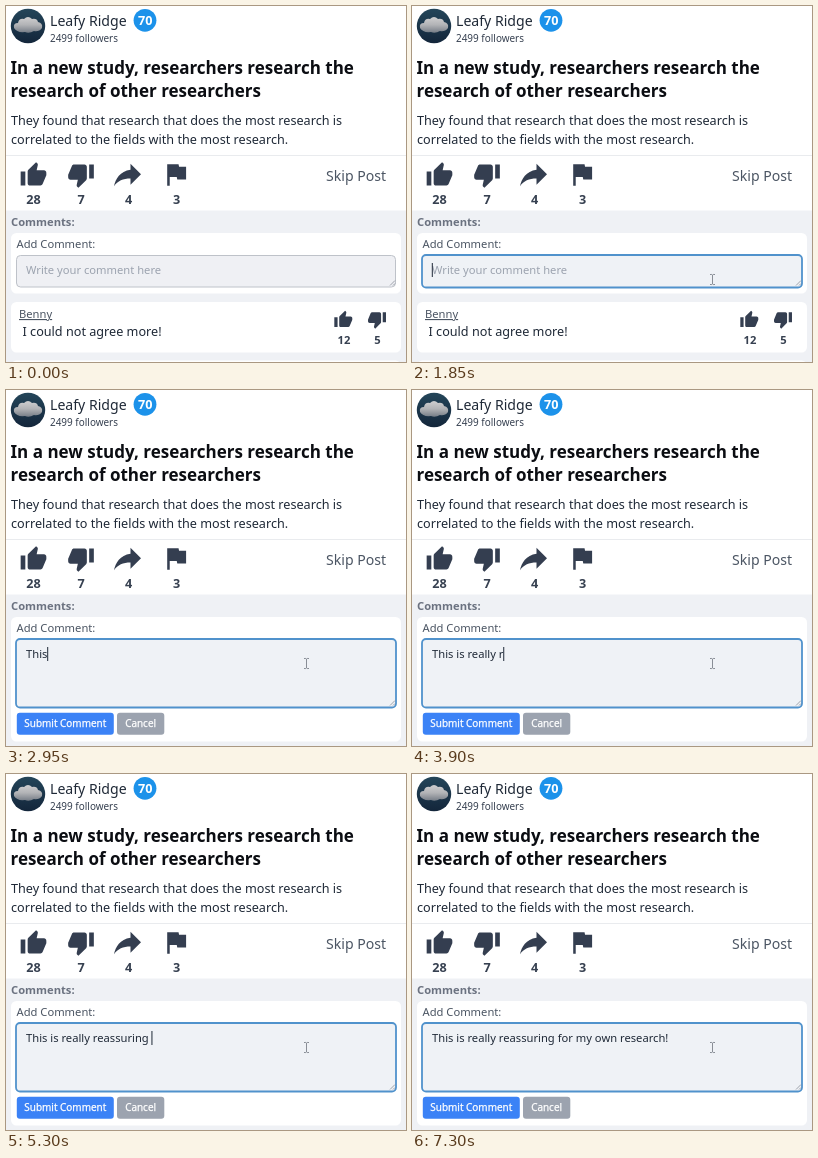
Animation, 400 px wide and 356 px high, one loop 8 s. Source, as an HTML page:

```html
<!DOCTYPE html>
<html lang="en">
<head>
<meta charset="utf-8">
<title>Comment box</title>
<style>
  html, body { margin: 0; width: 100%; height: 100%; overflow: hidden; background: #fff; }
  svg { display: block; width: 400px; height: 356px; font: 11.2px "Noto Sans", "Open Sans", sans-serif; }
  text { fill: #1f2937; white-space: pre; }
  .xl { font-size: 17px; font-weight: 700; fill: #0b0d12; }
  .lg { font-size: 14.1px; }
  .md { font-size: 12.65px; }
  .sm { font-size: 9.95px; }
  .bold { font-weight: 700; }
  .mid { text-anchor: middle; }
  .white { fill: #fff; }
  .slate { fill: #374151; }
  .gray { fill: #4b5563; }
  .button { font-weight: 500; stroke: #fff; stroke-width: .25; }
</style>
</head>
<body>
<svg viewBox="0 0 400 356">
  <defs>
    <clipPath id="round"><circle cx="22" cy="20" r="17.2"/></clipPath>
    <linearGradient id="sky" x2="0" y2="1">
      <stop stop-color="#24465a"/><stop offset="1" stop-color="#13253a"/>
    </linearGradient>
    <linearGradient id="cloud" x2="0" y2="1">
      <stop stop-color="#cfcfd0"/><stop offset=".5" stop-color="#b2b3b6"/><stop offset="1" stop-color="#757c86"/>
    </linearGradient>
    <path id="thumb" transform="translate(-12 -12)" d="M1 21h4V9H1zM23 10c0-1.1-.9-2-2-2h-6.3l1-4.6v-.3c0-.4-.2-.8-.5-1.1L14.2 1 7.6 7.6C7.2 8 7 8.5 7 9v10c0 1.1.9 2 2 2h9c.8 0 1.5-.5 1.8-1.2l3-7.1c.1-.2.2-.4.2-.7z"/>
  </defs>

  <!-- Post -->
  <g clip-path="url(#round)">
    <rect x="4" y="2" width="36" height="36" fill="url(#sky)"/>
    <path fill="url(#cloud)" d="M8 22q-1-5 4-5 1-5 6-4 4-4 8 0 5-1 6 3 5 1 4 6-3 4-8 3-5 3-9 1-8 1-11-4z"/>
  </g>
  <text class="lg" x="44" y="19.5">Leafy Ridge</text>
  <text class="sm slate" x="44" y="36.2">2499 followers</text>
  <circle cx="139" cy="14.3" r="11.4" fill="#1c92ea"/>
  <text class="md bold white mid" x="139.2" y="18.8">70</text>
  <text class="xl" x="4.5" y="68">In a new study, researchers research the</text>
  <text class="xl" x="4.5" y="90.5">research of other researchers</text>
  <text class="md" x="5" y="118.5">They found that research that does the most research is</text>
  <text class="md" x="5" y="138.2">correlated to the fields with the most research.</text>
  <path d="M0 149.5H400" stroke="#e9ebee"/>
  <g fill="#343e50">
    <use href="#thumb" transform="translate(27.5 169) scale(1.167)"/>
    <use href="#thumb" transform="translate(75 169) scale(-1.167)"/>
    <path transform="translate(103.5 150.2) scale(1.5)" d="M14 9V5l7 7-7 7v-4.1c-5 0-8.5 1.6-11 5.1 1-5 4-10 11-11z"/>
    <path transform="translate(154.9 153.3) scale(1.26)" d="M14.4 6L14 4H5v17h2v-7h5.6l.4 2h7V6z"/>
  </g>
  <g class="md bold mid">
    <text class="slate" x="27.5" y="197.5">28</text>
    <text class="slate" x="75" y="197.5">7</text>
    <text class="slate" x="122.5" y="197.5">4</text>
    <text class="slate" x="170.5" y="197.5">3</text>
  </g>
  <text class="lg gray" x="320" y="175">Skip Post</text>

  <!-- Comments -->
  <rect y="204.5" width="400" height="152" fill="#eff1f5"/>
  <text class="bold" x="5" y="219.5" style="fill:#6b7280">Comments:</text>
  <rect id="card" x="5" y="227" width="390" rx="5.5" fill="#fff"/>
  <text class="gray" x="10.5" y="242">Add Comment:</text>
  <rect id="box" rx="4"/>
  <path id="grip" d="M384 279.5l5-5M387 279.5l2-2" stroke="#8a8f98" stroke-width=".8"/>
  <text id="hint" x="20" y="268" style="fill:#9ca3af">Write your comment here</text>
  <text id="typed" x="20" y="268" xml:space="preserve"></text>
  <rect id="caret" y="257" width="1" height="14" fill="#1f2937"/>

  <g id="reply">
    <rect x="5" y="296" width="390" height="50.5" rx="5.5" fill="#fff"/>
    <rect x="5" y="354.5" width="390" height="50" rx="5.5" fill="#fff"/>
    <text class="gray" x="13" y="312" text-decoration="underline">Benny</text>
    <text class="md" x="16.5" y="330">I could not agree more!</text>
    <g fill="#343e50">
      <use href="#thumb" transform="translate(337.3 313.7) scale(.817)"/>
      <use href="#thumb" transform="translate(371 313.7) scale(-.817)"/>
    </g>
    <text class="bold mid slate" x="338" y="338">12</text>
    <text class="bold mid slate" x="371.5" y="338">5</text>
  </g>

  <g id="buttons">
    <rect x="10.8" y="322.8" width="97" height="22" rx="3" fill="#3b82f6"/>
    <text class="sm button white mid" x="59.3" y="337.3">Submit Comment</text>
    <rect x="111" y="322.8" width="47.3" height="22" rx="3" fill="#9ca3af"/>
    <text class="sm button white mid" x="134.6" y="337.3">Cancel</text>
  </g>

  <g id="mouse">
    <path id="beam" d="M-2.5-5H-.7L0-4.4.7-5H2.5M0-4.4V4.4M-2.5 5H-.7L0 4.4.7 5H2.5" fill="none" stroke="#7d838c" stroke-width=".9"/>
    <path id="arrow" d="M0 0V11l2.6-2.4L4.3 12.5l1.6-.7L4.2 8H7.7z" fill="#111" stroke="#fff" stroke-width=".7"/>
  </g>
</svg>
<script>
const LOOP = 8000, EXPAND = 2600;
const message = "This is really reassuring for my own research!";
// Time in ms at which each character appears
const keys = [
  2600, 2700, 2850, 2950, 3000, 3100, 3200, 3250, 3350, 3500, 3550, 3650, 3650, 3750, 3750,
  3900, 3950, 4150, 4250, 4400, 4850, 4950, 5050, 5100, 5200, 5300,
  5450, 5500, 5550, 5600, 5700, 5750, 5850, 5900, 6000, 6050, 6100, 6200, 6250,
  6350, 6450, 6650, 6700, 6900, 6950, 7250];

const el = id => document.getElementById(id);
const set = (id, attrs) => { for (const k in attrs) el(id).setAttribute(k, attrs[k]); };
const show = (id, on) => set(id, { visibility: on ? "visible" : "hidden" });
const progress = (t, from, to) => Math.min(1, Math.max(0, (t - from) / (to - from)));
const mix = (a, b, p) => `rgb(${a.map((v, i) => v + (b[i] - v) * p)})`;

function caretOpacity(t) {
  if (t < 1750 || t >= 7300) return 0;
  return t < 4850 ? 1 - progress(t, 4500, 4650) : 1;
}

function draw(t) {
  const open = t >= EXPAND;
  const focus = progress(t, 1700, 1850);
  const grow = open ? 36 : 0;

  set("card", { height: open ? 124.5 : 60.5 });
  set("box", {
    x: 10.5 - focus / 2,
    y: 249.5 - focus / 2,
    width: 379 + focus,
    height: 31.5 + grow + focus,
    fill: mix([239, 240, 244], [239, 242, 246], focus),
    stroke: mix([190, 194, 201], [80, 146, 204], focus),
    "stroke-width": 1 + 0.8 * focus
  });
  set("grip", { transform: `translate(0 ${grow})` });
  show("hint", !open);
  show("reply", !open);
  show("buttons", open);

  const count = keys.filter(k => k <= t).length;
  el("typed").textContent = message.slice(0, count);
  set("caret", {
    x: 19.8 + (count ? el("typed").getComputedTextLength() : 0),
    opacity: caretOpacity(t)
  });

  const move = 1 - (1 - progress(t, 1300, 1700)) ** 2;
  const y = 360 - 86.5 * move;
  set("mouse", { transform: `translate(${286 + 14.5 * move} ${y})` });
  show("beam", t >= 1350 && y < 282);
  show("arrow", t >= 1350 && y >= 282);
}

function tick() {
  draw(performance.now() % LOOP);
  requestAnimationFrame(tick);
}
tick();
</script>
</body>
</html>
```
